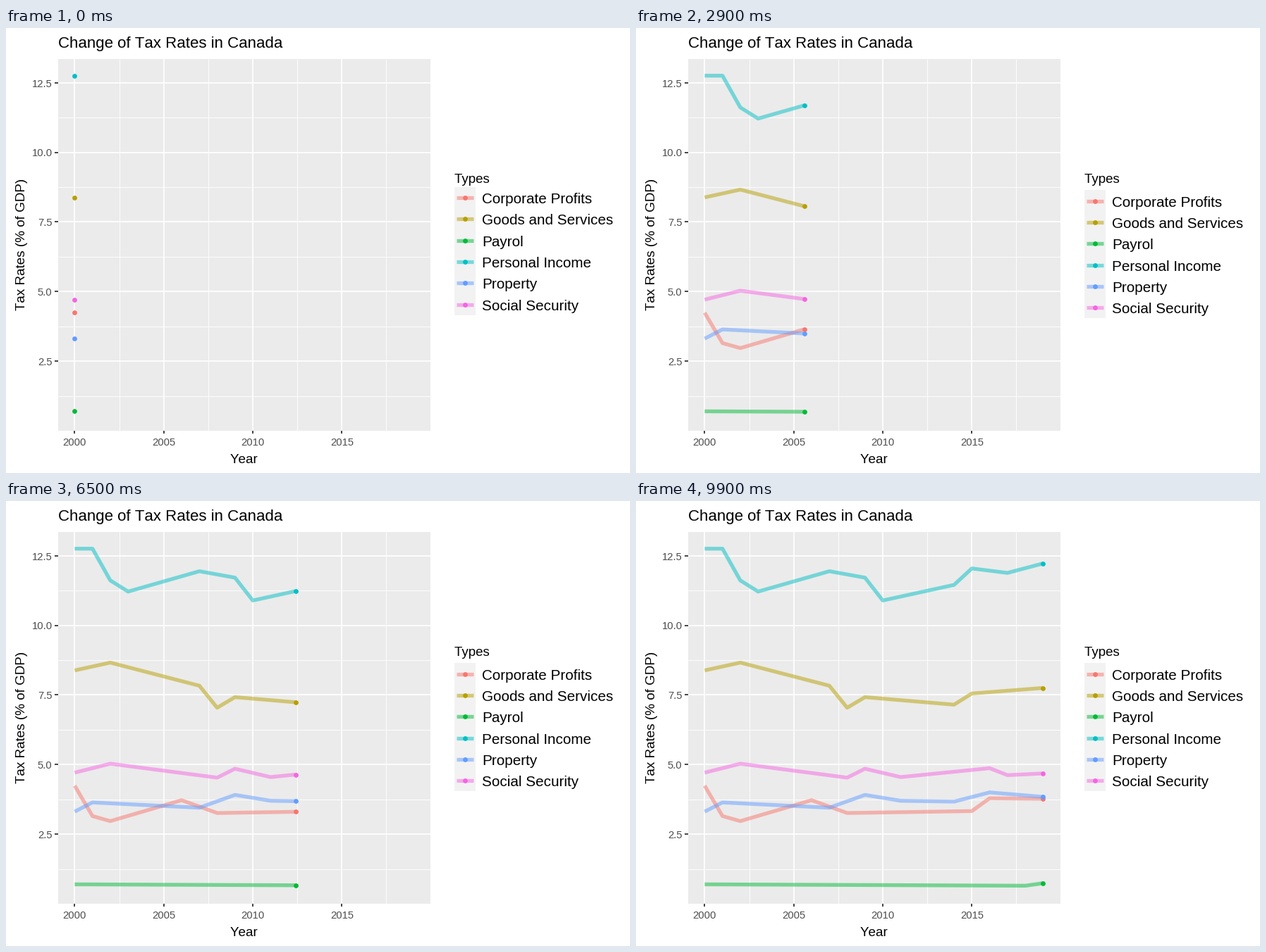
A matplotlib script that plays this animation: 885x632 px, repeating every 10000 ms.

```python
import numpy as np
import matplotlib.pyplot as plt
from matplotlib.animation import FuncAnimation
from matplotlib.patches import Rectangle

W, H, DPI = 885, 632, 120
FRAMES, INTERVAL = 100, 100
SPAN = 19  # years shown after 2000
PX = 72 / DPI  # points per pixel
plt.rcParams.update({
    "font.family": ["Liberation Sans", "DejaVu Sans"],
    "text.kerning_factor": 6,  # effectively no kerning
})

# Turning points as (years after 2000, value); straight runs between them.
SERIES = [
    ("Corporate Profits", "#F8766D",
     [(0, 4.24), (1, 3.15), (2, 2.97), (6, 3.72), (8, 3.26),
      (15, 3.33), (16, 3.79), (19, 3.77)]),
    ("Goods and Services", "#B79F00",
     [(0, 8.38), (2, 8.66), (7, 7.83), (8, 7.04), (9, 7.42),
      (14, 7.15), (15, 7.55), (19, 7.75)]),
    ("Payrol", "#00BA38",
     [(0, 0.70), (18, 0.65), (19, 0.74)]),
    ("Personal Income", "#00BFC4",
     [(0, 12.75), (1, 12.75), (2, 11.61), (3, 11.21), (7, 11.94), (9, 11.71),
      (10, 10.89), (14, 11.45), (15, 12.04), (17, 11.88), (19, 12.22)]),
    ("Property", "#619CFF",
     [(0, 3.31), (1, 3.64), (7, 3.45), (9, 3.91), (11, 3.70),
      (14, 3.67), (16, 4.00), (19, 3.84)]),
    ("Social Security", "#F564E3",
     [(0, 4.71), (2, 5.03), (8, 4.53), (9, 4.85), (11, 4.55),
      (16, 4.87), (17, 4.62), (19, 4.68)]),
]

LEFT, RIGHT, TOP, BOTTOM = 74, 602, 43.5, 571.5
KEY_X, KEY_W, KEY_H = 635.7, 30.3, 30.33
LEGEND_FIRST, LEGEND_REST = 226, 230.4
LINE_W, DOT = 5.33, 6.8

# Each year starts on a whole frame; steps within a year are even.
YEARS = np.arange(SPAN + 1)
YEAR_FRAMES = np.round(YEARS * (FRAMES - 1) / SPAN)


def to_x(year):
    return 97.4 + 25.26 * np.asarray(year)


def to_y(value):
    return 572.1 - 39.56 * np.asarray(value)


fig = plt.figure(figsize=(W / DPI, H / DPI), dpi=DPI, facecolor="white")
ax = fig.add_axes([0, 0, 1, 1])
ax.set_xlim(0, W)
ax.set_ylim(H, 0)
ax.axis("off")


def box(x, y, w, h, color):
    return ax.add_patch(Rectangle((x, y), w, h, fc=color, ec="none", zorder=1))


def stroke(xs, ys, color, width, z=2, **kw):
    return ax.plot(xs, ys, color=color, lw=width * PX, zorder=z,
                   solid_capstyle="butt", solid_joinstyle="round", **kw)[0]


def dot(x, y, color):
    return ax.plot([x], [y], "o", color=color, ms=DOT * PX, mew=0,
                   zorder=6, snap=False)[0]


def label(x, y, s, size, color="black", **kw):
    kw.setdefault("va", "baseline")
    return ax.text(x, y, s, fontsize=size * PX, color=color, **kw)


def draw_panel():
    box(LEFT, TOP, RIGHT - LEFT, BOTTOM - TOP, "#EBEBEB")
    for year in np.arange(2.5, 18, 5):
        stroke([to_x(year)] * 2, [TOP, BOTTOM], "white", 0.89)
    for value in np.arange(1.25, 12, 2.5):
        stroke([LEFT, RIGHT], [to_y(value)] * 2, "white", 0.89)
    for year in range(0, 16, 5):
        x = to_x(year)
        stroke([x, x], [TOP, BOTTOM], "white", 1.78, 3)
        stroke([x, x], [BOTTOM, BOTTOM + 4.6], "#333333", 1.78)
        label(x, 593, str(2000 + year), 14.8, "#4D4D4D", ha="center")
    for value in np.arange(2.5, 13, 2.5):
        y = to_y(value)
        stroke([LEFT, RIGHT], [y, y], "white", 1.78, 3)
        stroke([LEFT - 4.6, LEFT], [y, y], "#333333", 1.78)
        label(65.5, y + 6, f"{value:.1f}", 14.8, "#4D4D4D", ha="right")
    label(74, 28.3, "Change of Tax Rates in Canada", 22.3)
    label(337.5, 618.5, "Year", 18.9, ha="center")
    label(31, 307.5, "Tax Rates (% of GDP)", 18.9, rotation=90,
          ha="right", va="center")
    label(636, 219.8, "Types", 18.7)


draw_panel()

keys = box(KEY_X, LEGEND_REST, KEY_W, KEY_H * len(SERIES), "#F2F2F2")
rows, trails, heads = [], [], []
for name, color, _ in SERIES:
    sample = stroke([KEY_X + 0.1 * KEY_W, KEY_X + 0.9 * KEY_W], [0, 0],
                    color, LINE_W, alpha=0.5)
    rows.append((sample, dot(KEY_X + KEY_W / 2, 0, color),
                 label(675, 0, name, 20.7)))
    trails.append(stroke([], [], color, LINE_W, 5, alpha=0.5))
    heads.append(dot(0, 0, color))


def place_legend(top):
    keys.set_y(top)
    for i, (sample, mark, text) in enumerate(rows):
        y = top + (i + 0.5) * KEY_H
        sample.set_ydata([y, y])
        mark.set_ydata([y])
        text.set_y(y + 8)


def update(i):
    now = np.interp(i, YEAR_FRAMES, YEARS)
    ts = np.append(YEARS[YEARS < now], now)
    for (_, _, turns), trail, head in zip(SERIES, trails, heads):
        ys = to_y(np.interp(ts, *zip(*turns)))
        trail.set_data(to_x(ts), ys)
        trail.set_visible(i > 0)
        head.set_data([to_x(now)], [ys[-1]])
    place_legend(LEGEND_FIRST if i == 0 else LEGEND_REST)
    return trails + heads


anim = FuncAnimation(fig, update, frames=FRAMES, interval=INTERVAL,
                     repeat=True, repeat_delay=0, blit=False)
plt.show()
```
